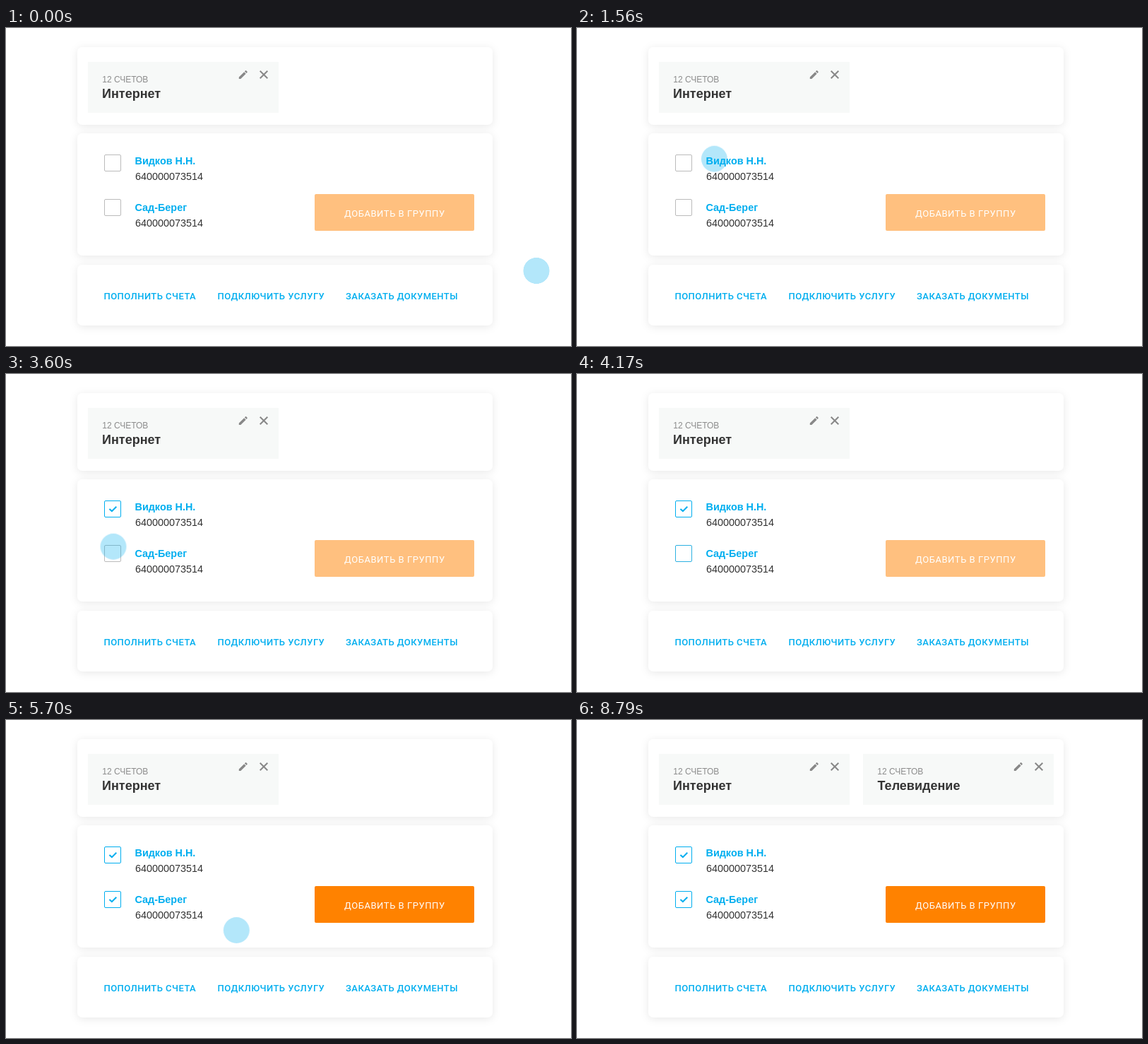
Write an HTML page that moves like this. It is 800x450 px and loops after 9840 ms.

```html
<!DOCTYPE html>
<html lang="ru">
<head>
<meta charset="utf-8">
<title>Группы счетов</title>
<style>
  html, body { margin: 0; width: 100%; height: 100%; overflow: hidden; background: #fff; }
  body { position: relative; }
  svg { position: absolute; left: 0; top: 0; display: block; }

  svg, .dot, .dot i { --loop: 9840ms; }
  .card { fill: #fff; filter: drop-shadow(0 2px 6px rgba(0, 0, 0, .09)); }
  .tile { fill: #f7f9f8; }
  text { font-family: "Liberation Sans", Arial, sans-serif; white-space: pre; }
  .count { font-size: 12px; fill: #8c8c8c; }
  .title { font-size: 18px; font-weight: 700; fill: #333; }
  .name { font-size: 14.4px; font-weight: 700; fill: #00aeef; }
  .number { font-size: 14.4px; fill: #333; }
  .caps { font: 500 13px Roboto, sans-serif; letter-spacing: .45px; fill: #00aeef; }
  .button .caps { font-weight: 400; letter-spacing: .55px; fill: #fff; }
  .box { fill: none; stroke: #bbb; }
  .tick { fill: none; stroke: #00aeef; stroke-width: 2; stroke-dasharray: 1 2; stroke-dashoffset: 1; }
  .dot { position: absolute; left: 0; top: 0; width: 0; height: 0;
    offset-path: path("M750.5 343Q451 157 151.5 188L151.5 254Q313 334 474.5 265");
    offset-rotate: 0deg; animation: move var(--loop) infinite; }
  .dot i { position: absolute; left: -18.5px; top: -18.5px; width: 37px; height: 37px;
    border-radius: 50%; background: #00aeef; opacity: .3;
    animation: grow var(--loop) cubic-bezier(.5, 0, .5, 1) infinite, fade var(--loop) linear infinite; }

  /* pointer */
  @keyframes move {
    0% { offset-distance: 0px; }
    9.146% { offset-distance: 0px; animation-timing-function: cubic-bezier(.33, 0, .35, 1); }
    18.293% { offset-distance: 630.5px; }
    33.537% { offset-distance: 630.5px; animation-timing-function: cubic-bezier(.45, 0, .55, 1); }
    37.805% { offset-distance: 696.5px; }
    55.183% { offset-distance: 696.5px; animation-timing-function: cubic-bezier(.36, 0, .45, 1); }
    61.28%, 100% { offset-distance: 1030.8px; }
  }
  @keyframes grow {
    0%, 21.341% { transform: scale(1); }
    23.476%, 24.5% { transform: scale(2.89); }
    24.501%, 38.415% { transform: scale(1); }
    40.549%, 41.6% { transform: scale(2.89); }
    41.601%, 71.037% { transform: scale(1); }
    73.171%, 100% { transform: scale(2.89); }
  }
  @keyframes fade {
    0%, 21.341% { opacity: .3; }
    24.39%, 29.878% { opacity: 0; }
    32.317%, 38.415% { opacity: .3; }
    41.463%, 51.524% { opacity: 0; }
    53.963%, 71.037% { opacity: .3; }
    74.085%, 100% { opacity: 0; }
  }

  /* checkboxes */
  .first .box { animation: border1 var(--loop) linear infinite; }
  .first .tick { animation: tick1 var(--loop) linear infinite; }
  .second .box { animation: border2 var(--loop) linear infinite; }
  .second .tick { animation: tick2 var(--loop) linear infinite; }
  @keyframes border1 { 0%, 24.39% { stroke: #bbb; } 25.61%, 100% { stroke: #00aeef; } }
  @keyframes tick1 { 0%, 25.61% { stroke-dashoffset: 1; } 28.659%, 100% { stroke-dashoffset: 0; } }
  @keyframes border2 { 0%, 41.463% { stroke: #bbb; } 42.683%, 100% { stroke: #00aeef; } }
  @keyframes tick2 { 0%, 42.683% { stroke-dashoffset: 1; } 45.732%, 100% { stroke-dashoffset: 0; } }

  .button rect { fill: #ff8200; animation: enable var(--loop) linear infinite; }
  @keyframes enable { 0%, 49.085% { opacity: .5; } 50.61%, 100% { opacity: 1; } }

  /* new group */
  .new .tile { animation: tile var(--loop) linear infinite; }
  .new .count { animation: count var(--loop) linear infinite; }
  .new .icons { animation: icons var(--loop) linear infinite; }
  .new .title { animation: title var(--loop) step-end infinite; }
  .new tspan { fill-opacity: 0; animation: letter var(--loop) step-end infinite; animation-delay: calc(var(--i) * 57ms); }
  @keyframes tile { 0%, 73.171% { opacity: 0; } 74.39%, 100% { opacity: 1; } }
  @keyframes count { 0%, 74.085% { opacity: 0; } 75.61%, 100% { opacity: 1; } }
  @keyframes icons { 0%, 77.134% { opacity: 0; } 79.573%, 100% { opacity: 1; } }
  @keyframes title { 0% { opacity: 0; } 83.53%, 100% { opacity: 1; } }
  @keyframes letter { 0% { fill-opacity: 0; } 83.53%, 100% { fill-opacity: 1; } }
</style>
</head>
<body>
<svg width="800" height="450" viewBox="0 0 800 450">
  <defs>
    <g id="icons">
      <path transform="translate(327.8 58) scale(.6667)" fill="#888" d="M3 17.25V21h3.75L17.81 9.94l-3.75-3.75zM20.71 7.04c.39-.39.39-1.02 0-1.41l-2.34-2.34c-.39-.39-1.02-.39-1.41 0l-1.83 1.83 3.75 3.75z"/>
      <path d="M359.7 60.7l10.6 10.6M370.3 60.7l-10.6 10.6" stroke="#888" stroke-width="2"/>
    </g>
    <rect id="box" x="139.5" y="179.5" width="23" height="23" rx="1.5"/>
    <path id="tick" pathLength="1" d="M146.4 190.9L149.9 194.1L156.3 187.7"/>
  </defs>

  <rect class="card" x="101" y="27" width="588" height="110" rx="7"/>
  <rect class="card" x="101" y="149" width="588" height="173" rx="7"/>
  <rect class="card" x="101" y="335" width="588" height="86" rx="7"/>

  <g>
    <rect class="tile" x="116" y="48" width="270" height="72"/>
    <text class="count" x="136.3" y="77">12 СЧЕТОВ</text>
    <text class="title" x="136" y="99">Интернет</text>
    <use href="#icons"/>
  </g>
  <g class="new" transform="translate(289)">
    <rect class="tile" x="116" y="48" width="270" height="72"/>
    <text class="count" x="136.3" y="77">12 СЧЕТОВ</text>
    <text class="title" id="typed" x="136.5" y="99">Телевидение</text>
    <use class="icons" href="#icons"/>
  </g>

  <g class="first">
    <use class="box" href="#box"/>
    <use class="tick" href="#tick"/>
    <text class="name" x="182.5" y="193">Видков Н.Н.</text>
    <text class="number" x="183" y="215">640000073514</text>
  </g>
  <g class="second">
    <use class="box" href="#box" y="63"/>
    <use class="tick" href="#tick" y="63"/>
    <text class="name" x="182.5" y="259">Сад-Берег</text>
    <text class="number" x="183" y="281">640000073514</text>
  </g>

  <g class="button">
    <rect x="437" y="235" width="226" height="52" rx="2"/>
    <text class="caps" x="479" y="267">ДОБАВИТЬ В ГРУППУ</text>
  </g>

  <text class="caps" x="138.5" y="384">ПОПОЛНИТЬ СЧЕТА</text>
  <text class="caps" x="299.5" y="384">ПОДКЛЮЧИТЬ УСЛУГУ</text>
  <text class="caps" x="481" y="384">ЗАКАЗАТЬ ДОКУМЕНТЫ</text>
</svg>
<div class="dot"><i></i></div>
<script>
  // One span per letter, so that each appears in its turn
  const typed = document.getElementById("typed");
  const letters = [...typed.textContent].map((char, i) => {
    const span = document.createElementNS(typed.namespaceURI, "tspan");
    span.textContent = char;
    span.style.setProperty("--i", i);
    return span;
  });
  typed.replaceChildren(...letters);
</script>
</body>
</html>
```
